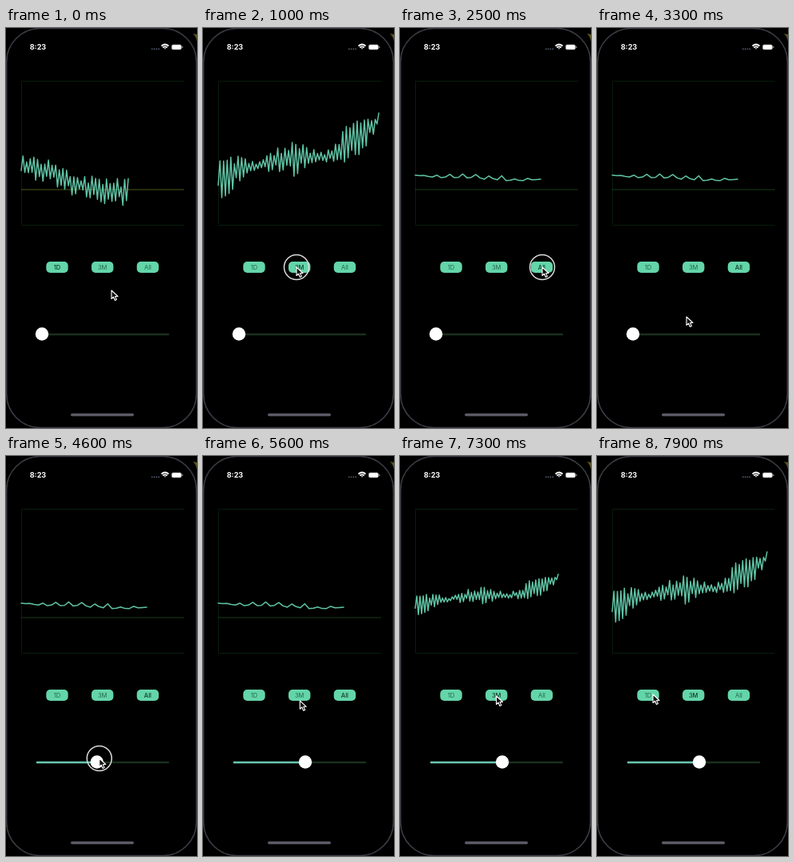
Recreate the animation shown at these times as an HTML page. Size 239 by 500 pixels, loop 8000 ms.

```html
<!DOCTYPE html>
<html lang="en">
<head>
<meta charset="utf-8">
<title>Animated chart</title>
<style>
html, body { margin: 0; width: 100%; height: 100%; overflow: hidden; background: #000; }
svg { display: block; width: 100vw; height: 100vh; }
text { font-family: Inter, Roboto, sans-serif; }
.tab { font-size: 7.5px; text-anchor: middle; fill: #21654d; }
.tab.on { fill: #0f3a2b; font-weight: 500; }
</style>
</head>
<body>
<svg viewBox="0 0 239 500">
  <rect width="239" height="500" fill="#000"/>
  <path d="M234 7Q238 11 239 17V8Z" fill="#5b5420"/>
  <rect x=".7" y=".5" width="237.6" height="499" rx="42" fill="#000" stroke="#3b3b44" stroke-width="1.6"/>

  <text x="29.7" y="27.3" font-size="9.1" font-weight="700" fill="#fff">8:23</text>
  <path d="M182 26.2H192" stroke="#596277" stroke-width="1.4" stroke-dasharray="1.5 1.3"/>
  <g fill="none" stroke="#fff" stroke-width="1.7">
    <path d="M194.5 22.5Q199 18.5 203.5 22.5M196.3 24.5Q199 22.2 201.7 24.5"/>
    <path d="M197.8 25.2H200.2L199 26.8Z" fill="#fff" stroke="none"/>
  </g>
  <rect x="207.4" y="20.9" width="12" height="6" rx="1.7" fill="#fff" stroke="#999" stroke-width=".7"/>
  <path d="M220.8 22.8V25" stroke="#aaa"/>

  <path d="M222 66.5H19.5V246.5H222" fill="none" stroke="#123a16" stroke-dasharray="1 1"/>
  <path id="zero" d="M19 202H223" stroke-dasharray="1.3 .7"/>
  <polyline id="line" fill="none" stroke="#5fc3a4" stroke-width="1.5" stroke-linejoin="round" stroke-linecap="round"/>

  <g id="tabs"></g>

  <path d="M39 383H203" stroke="#1a301d" stroke-width="2.4" stroke-linecap="round"/>
  <path id="fill" stroke="#68c3ae" stroke-width="2.6" stroke-linecap="round"/>
  <circle id="thumb" cy="382.5" r="8.2" fill="#fff"/>
  <rect x="81" y="481.8" width="79" height="3.4" rx="1.7" fill="#5b5b66"/>

  <g id="cursor">
    <circle id="ring" r="15.5" fill="none" stroke="#ddd" stroke-width="1.5"/>
    <path d="M0 0V10.5L2.5 8.2L4.4 12.5L6.4 11.6L4.6 7.5H8Z" fill="#111" stroke="#fff" stroke-width="1.1" stroke-linejoin="round"/>
  </g>
</svg>
<script>
const LOOP = 8000, STEP = 100, LEFT = 19;
const THUMB_MIN = 45, THUMB_MAX = 128, DRAG = [3900, 5000];
const $ = id => document.getElementById(id);
const lerp = (a, b, p) => a + (b - a) * p;
const clamp = (v, lo, hi) => Math.min(hi, Math.max(lo, v));
const smooth = p => p * p * (3 - 2 * p);

// Value of an evenly spaced list at u = 0..1
function sample(ys, u) {
  const f = u * (ys.length - 1), i = Math.min(Math.floor(f), ys.length - 2);
  return lerp(ys[i], ys[i + 1], f - i);
}

function seeded(s) {
  return () => (s = s * 16807 % 2147483647) / 2147483647;
}

// A trend with a zigzag of random strength around it
function series(count, period, seed, trend, swing) {
  const random = seeded(seed);
  return Array.from({ length: count }, (_, i) => {
    const u = i / (count - 1);
    const wave = Math.cos(2 * Math.PI * (i + 1) / period);
    return sample(trend, u) - swing(u) * wave * (.3 + .8 * random());
  });
}

const day = { tab: 0, end: 153, zero: '#74891f',
  ys: series(60, 2, 4721, [174, 177, 195, 202, 206], u => 13 + 4 * u) };
const quarter = { tab: 1, end: 220, zero: 'none',
  ys: series(90, 2, 9137, [189, 176, 167, 159, 162, 140, 115],
    u => 15 + 9 * Math.cos(2 * Math.PI * (u - .05) / .4)) };
const all = { tab: 2, end: 176, zero: '#245d22',
  ys: series(30, 3, 3391, [184, 186, 185, 187, 190, 189], u => 5 * Math.sin(Math.PI * u)) };

// Time, chart shown, length of the morph
const clicks = [[-LOOP, day, 0], [1000, quarter, 0], [2500, all, 0], [5930, quarter, 2740]];

// Start, end and goal of each pointer move
const moves = [
  [0, 700, 117, 299], [1900, 2350, 178, 299], [2700, 3300, 112, 361], [3400, 3700, 48, 378],
  [3900, 4850, 131, 378], [5100, 5700, 120.5, 300], [7400, 7800, 70, 298]];

function pointer(t) {
  let x = 132, y = 328;
  for (const [from, to, goalX, goalY] of moves) {
    const p = smooth(clamp((t - from) / (to - from), 0, 1));
    x = lerp(x, goalX, p);
    y = lerp(y, goalY, p);
  }
  return [x, y];
}

// Timing curve cubic-bezier(.42, 0, .58, 1)
function easeInOut(x) {
  let lo = 0, hi = 1;
  for (let i = 0; i < 20; i++) {
    const s = (lo + hi) / 2, r = 1 - s;
    if (1.26 * s * r * r + 1.74 * s * s * r + s ** 3 < x) lo = s; else hi = s;
  }
  return smooth(lo);
}

function morph(from, to, p) {
  const last = to.ys.length - 1, end = lerp(from.end, to.end, p);
  return to.ys.map((y, i) => {
    const u = i / last;
    return `${lerp(LEFT, end, u).toFixed(2)},${lerp(sample(from.ys, u), y, p).toFixed(2)}`;
  }).join(' ');
}

$('tabs').innerHTML = ['1D', '3M', 'All'].map((name, i) => {
  const x = 64 + i * 56.7;
  return `<rect x="${x - 13.7}" y="292" width="27.4" height="14" rx="5" fill="#64d5a9"/>
    <text class="tab" x="${x}" y="301.7">${name}</text>`;
}).join('');
const labels = document.querySelectorAll('.tab');

function draw(t) {
  const n = clicks.findLastIndex(c => c[0] <= t);
  const [start, chart, length] = clicks[n];
  const p = length ? easeInOut(Math.min(1, (t - start) / length)) : 1;
  $('line').setAttribute('points', morph(n ? clicks[n - 1][1] : chart, chart, p));
  $('zero').setAttribute('stroke', chart.zero);
  labels.forEach((label, i) => label.classList.toggle('on', i === chart.tab));

  // The thumb follows the pointer while it is dragged
  const grip = pointer(clamp(t, ...DRAG))[0];
  const thumb = clamp(grip - 3, THUMB_MIN, THUMB_MAX);
  $('thumb').setAttribute('cx', thumb);
  $('fill').setAttribute('d', thumb > THUMB_MIN ? `M39 383H${thumb}` : '');

  $('cursor').setAttribute('transform', `translate(${pointer(t)})`);
  const down = t >= DRAG[0] && t < DRAG[1] || clicks.some(c => Math.abs(t - c[0]) < STEP);
  $('ring').setAttribute('visibility', down ? 'visible' : 'hidden');
}

const begin = performance.now();
function tick() {
  const t = (performance.now() - begin) % LOOP;
  draw(Math.floor(t / STEP) * STEP);
  requestAnimationFrame(tick);
}
tick();
</script>
</body>
</html>
```
